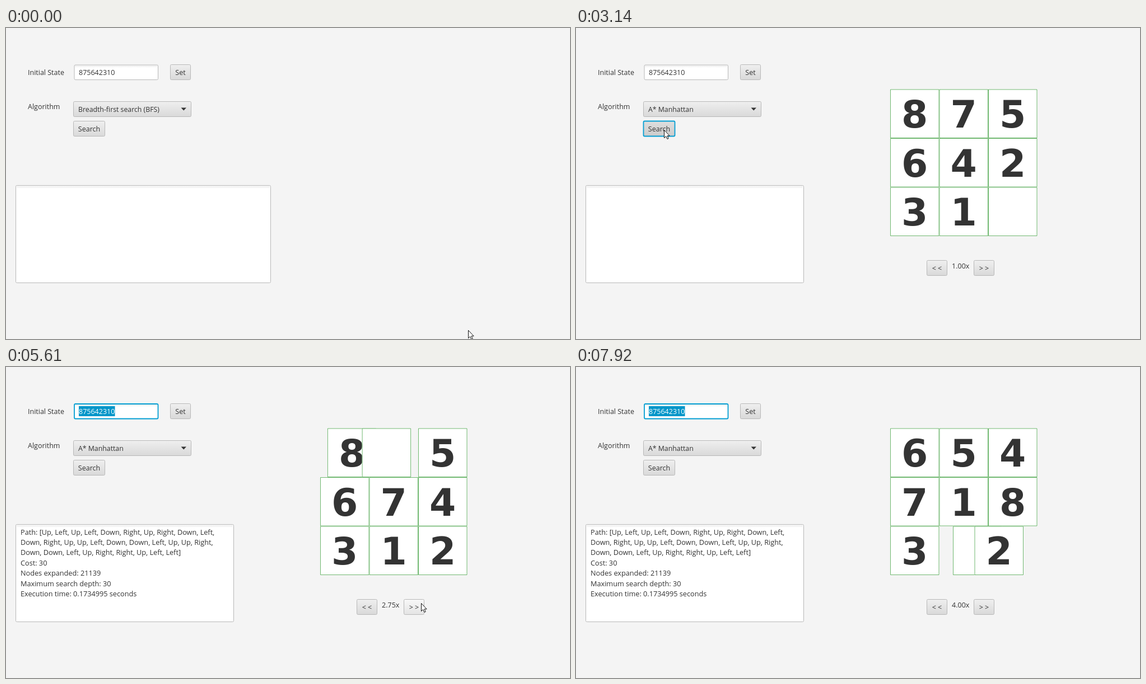
An HTML page for the animation above (8000 ms loop, 1007 by 556 pixels).

```html
<!DOCTYPE html>
<html lang="en">
<head>
<meta charset="utf-8">
<title>8-puzzle solver</title>
<style>
html, body { margin: 0; width: 100%; height: 100%; overflow: hidden; background: #f4f4f4; }
svg { display: block; }
text { font: 12.5px "Open Sans", "Noto Sans", sans-serif; fill: #333; white-space: pre; }
.combo { font-size: 12.3px; }
.report { font-size: 12.7px; }
.digit { font: bold 68px "DejaVu Sans", sans-serif; text-anchor: middle; }
.mid { text-anchor: middle; }
.tile rect { fill: #fff; }
.tile path { fill: none; stroke: #008000; stroke-opacity: .56; }
</style>
</head>
<body>
<svg id="stage" width="1007" height="556" viewBox="0 0 1007 556">
  <defs>
    <linearGradient id="normal" x2="0" y2="1"><stop stop-color="#efefef"/><stop offset="1" stop-color="#d9d9d9"/></linearGradient>
    <linearGradient id="hover" x2="0" y2="1"><stop stop-color="#f8f8f8"/><stop offset="1" stop-color="#e4e4e4"/></linearGradient>
    <linearGradient id="armed" x2="0" y2="1"><stop stop-color="#dedede"/><stop offset="1" stop-color="#cbcbcb"/></linearGradient>
    <linearGradient id="inset" x2="0" y2="1"><stop stop-color="#ececec"/><stop offset="1" stop-color="#fff"/></linearGradient>
    <filter id="shadow" x="-5%" y="-5%" width="110%" height="120%"><feDropShadow dx="0" dy="4" stdDeviation="2.5" flood-opacity=".35"/></filter>
  </defs>
</svg>
<script>
const stage = document.getElementById('stage');

function el(tag, attrs, parent = stage, text) {
  const node = document.createElementNS('http://www.w3.org/2000/svg', tag);
  for (const key in attrs) node.setAttribute(key, attrs[key]);
  if (text) node.textContent = text;
  parent.appendChild(node);
  return node;
}
const label = (x, y, text, cls = '', parent = stage) => el('text', { x, y, class: cls }, parent, text);
const show = (node, on) => node.setAttribute('visibility', on ? 'visible' : 'hidden');

function box(x, y, w, h, fill, parent = stage) {
  return el('rect', { x: x + .5, y: y + .5, width: w - 1, height: h - 1, rx: 2, fill, stroke: '#b8b8b8' }, parent);
}
function setFocus(rect, on) {
  rect.setAttribute('stroke', on ? '#039ed3' : '#b8b8b8');
  rect.setAttribute('stroke-width', on ? 1.8 : 1);
}
function button(x, y, w, h, text, parent) {
  const rect = box(x, y, w, h, 'url(#normal)', parent);
  if (text) label(x + w / 2, y + h / 2 + 4.7, text, 'mid', parent);
  return rect;
}

// Form
label(39, 84, 'Initial State');
label(39, 145, 'Algorithm');
const field = box(121.5, 65.5, 150.5, 27.5, '#fff');
el('rect', { x: 123, y: 67, width: 147, height: 4, fill: 'url(#inset)' });
const selection = el('rect', { x: 130, y: 70, width: 64.5, height: 18, fill: '#0096c9' });
const fieldText = label(130, 84, '875642310');
const setBtn = button(293, 65, 37, 28, 'Set');
const combo = button(120, 131, 211, 28);
const comboText = label(129, 150, '', 'combo');
el('path', { d: 'M312.5 142.5h9.5l-4.75 5z', fill: '#333' });
const searchBtn = button(120, 166, 57, 28, 'Search');

// Results
const area = box(17, 281, 456, 175, '#fff');
const areaShade = el('rect', { x: 19, y: 283, height: 4, fill: 'url(#inset)' });
const report = el('g', {});
['Path: [Up, Left, Up, Left, Down, Right, Up, Right, Down, Left,',
 'Down, Right, Up, Up, Left, Down, Down, Left, Up, Up, Right,',
 'Down, Down, Left, Up, Right, Right, Up, Left, Left]',
 'Cost: 30', 'Nodes expanded: 21139', 'Maximum search depth: 30',
 'Execution time: 0.1734995 seconds'
].forEach((line, i) => label(26, 299.5 + 18.4 * i, line, 'report', report));

// Board and speed controls
const CELL = 87.5;
const viewer = el('g', {});
const board = el('g', {}, viewer);
const tiles = [...'012345678'].map(d => {
  const g = el('g', { class: 'tile' }, board);
  el('rect', { width: CELL, height: CELL }, g);
  el('path', { d: `M.5.5H${CELL - .5}V${CELL - .5}H.5Z` }, g);
  if (d > 0) label(CELL / 2, 68.8, d, 'digit', g);
  return g;
});
button(626, 415, 37, 28, '< <', viewer);
const nextBtn = button(710, 415, 37, 28, '> >', viewer);
const speed = label(686.7, 430, '', 'mid', viewer);

// Drop-down list
const popup = el('g', {});
el('rect', { x: 120.5, y: 158.5, width: 209, height: 104, fill: '#fff', stroke: '#b0b0b0', filter: 'url(#shadow)' }, popup);
const algorithms = ['Breadth-first search (BFS)', 'Depth-first search (DFS)', 'A* Manhattan', 'A* Euclidean'];
const rows = algorithms.map((name, i) => {
  const y = 159.5 + 25.4 * i;
  const rect = el('rect', { x: 121, y, width: 208, height: 25.4, fill: '#0096c9' }, popup);
  if (!i) el('rect', { x: 122, y: y + 1, width: 206, height: 23.4, fill: 'none', stroke: '#30b2de' }, popup);
  return { rect, y, text: label(125.5, y + 17.6, name, 'combo', popup) };
});

// Pointer
const halo = el('circle', { r: 13, fill: '#ffff00', 'fill-opacity': .5 });
const pointer = el('path', {
  d: 'M.5.5V14.6L3.7 11.6 6 16.5 8.2 15.5 6 10.8H10.2Z', fill: '#fff', stroke: '#111', 'stroke-linejoin': 'round'
});

const LOOP = 8000;
const bursts = [0, 70, 620, 850, 1560, 2420, 3290, 5920];
const track = [
  [40, 825, 540], [470, 228, 146], [800, 228, 146], [1410, 245, 226], [1500, 245, 226],
  [2180, 312, 76], [2500, 312, 76], [3000, 157, 182], [3320, 157, 182],
  [3760, 520, 461], [4090, 741, 422], [6760, 741, 422], [7600, 941, 562]
];
const clicks = [4240, 4420, 4590, 4740, 4900, 5180, 5400, 5720, 5960, 6180, 6410, 6660];
const starts = [3290, 4290, 5089, 5530, 5897, 6210, 6508, 6790, 7060, 7320, 7580, 7839, 8089];
const path = 'ULULDRURDLDR';
const offset = { U: -3, D: 3, L: -1, R: 1 };

function sample(t) {
  const start = bursts.filter(b => b <= t).pop();
  return start + Math.floor((t - start) / 80) * 80;
}

function easeBoth(p) {
  if (p < .2) return 3.125 * p * p;
  if (p > .8) return 1 - 3.125 * (1 - p) ** 2;
  return 1.25 * p - .125;
}

function pointerAt(t) {
  const i = track.findIndex(k => k[0] > t);
  if (i === 0) return track[0].slice(1);
  if (i < 0) return track[track.length - 1].slice(1);
  const [t0, x0, y0] = track[i - 1], [t1, x1, y1] = track[i];
  const p = (t - t0) / (t1 - t0), e = p * p * (3 - 2 * p);
  return [x0 + (x1 - x0) * e, y0 + (y1 - y0) * e];
}

let shownMove = -2;
function drawBoard(t) {
  const move = starts.filter(s => s <= t).length - 1;
  const cells = [...'875642310'].map(Number);
  for (let i = 0; i < move; i++) {
    const from = cells.indexOf(0), to = from + offset[path[i]];
    [cells[from], cells[to]] = [cells[to], cells[from]];
  }
  if (move !== shownMove) cells.forEach(d => board.appendChild(tiles[d]));
  shownMove = move;

  const blank = cells.indexOf(0);
  const target = move < 0 ? blank : blank + offset[path[move]];
  const p = move < 0 ? 0 : easeBoth((t - starts[move]) / (starts[move + 1] - starts[move]));
  cells.forEach((d, i) => {
    const to = i === blank ? target : i === target ? blank : i;
    const col = i % 3 + (to % 3 - i % 3) * p;
    const row = Math.floor(i / 3) + (Math.floor(to / 3) - Math.floor(i / 3)) * p;
    tiles[d].setAttribute('transform', `translate(${561 + CELL * col} ${109.5 + CELL * row})`);
  });
}

function focusAt(t, pressed) {
  if (t < 620) return null;
  if (t < 2420) return combo;
  if (t < 3060) return setBtn;
  if (t < 4140) return searchBtn;
  return t < 5050 || pressed ? nextBtn : field;
}

function draw(t) {
  const [x, y] = pointerAt(t);
  const pressed = clicks.some(c => t >= c - 100 && t < c);
  const open = t >= 700 && t < 1560;
  const ready = t >= 2500;
  const focus = focusAt(t, pressed);

  [field, setBtn, combo, searchBtn, nextBtn].forEach(r => setFocus(r, r === focus));
  show(selection, focus === field);
  fieldText.style.fill = focus === field ? '#fff' : '';

  const armed = open ? combo : t >= 2420 && t < 2500 ? setBtn
    : t >= 3060 && t < 3290 ? searchBtn : pressed ? nextBtn : null;
  for (const r of [setBtn, combo, searchBtn, nextBtn]) {
    const left = +r.getAttribute('x'), top = +r.getAttribute('y');
    const over = x >= left && x <= left + +r.getAttribute('width')
      && y >= top && y <= top + +r.getAttribute('height');
    r.setAttribute('fill', `url(#${r === armed ? 'armed' : over ? 'hover' : 'normal'})`);
  }

  comboText.textContent = algorithms[t < 1560 ? 0 : 2];
  show(popup, open);
  rows.forEach((row, i) => {
    const lit = i === 0 || (y >= row.y && y < row.y + 25.4);
    row.rect.setAttribute('fill', lit ? '#0096c9' : '#fff');
    row.text.style.fill = lit ? '#fff' : '';
  });

  area.setAttribute('width', ready ? 389 : 455);
  areaShade.setAttribute('width', ready ? 386 : 452);
  show(report, t >= 3290);
  show(viewer, ready);
  speed.textContent = (1 + clicks.filter(c => c <= t).length / 4).toFixed(2) + 'x';
  drawBoard(t);

  const tap = (t >= 620 && t < 700) || (t >= 2420 && t < 2500) || (t >= 3060 && t < 3140);
  show(halo, pressed || tap);
  halo.setAttribute('cx', x);
  halo.setAttribute('cy', y + 2);
  pointer.setAttribute('transform', `translate(${Math.round(x)} ${Math.round(y)})`);
}

const begin = performance.now();
function tick(now) {
  draw(sample(Math.max(0, now - begin) % LOOP));
  requestAnimationFrame(tick);
}
draw(0);
requestAnimationFrame(tick);
</script>
</body>
</html>
```
